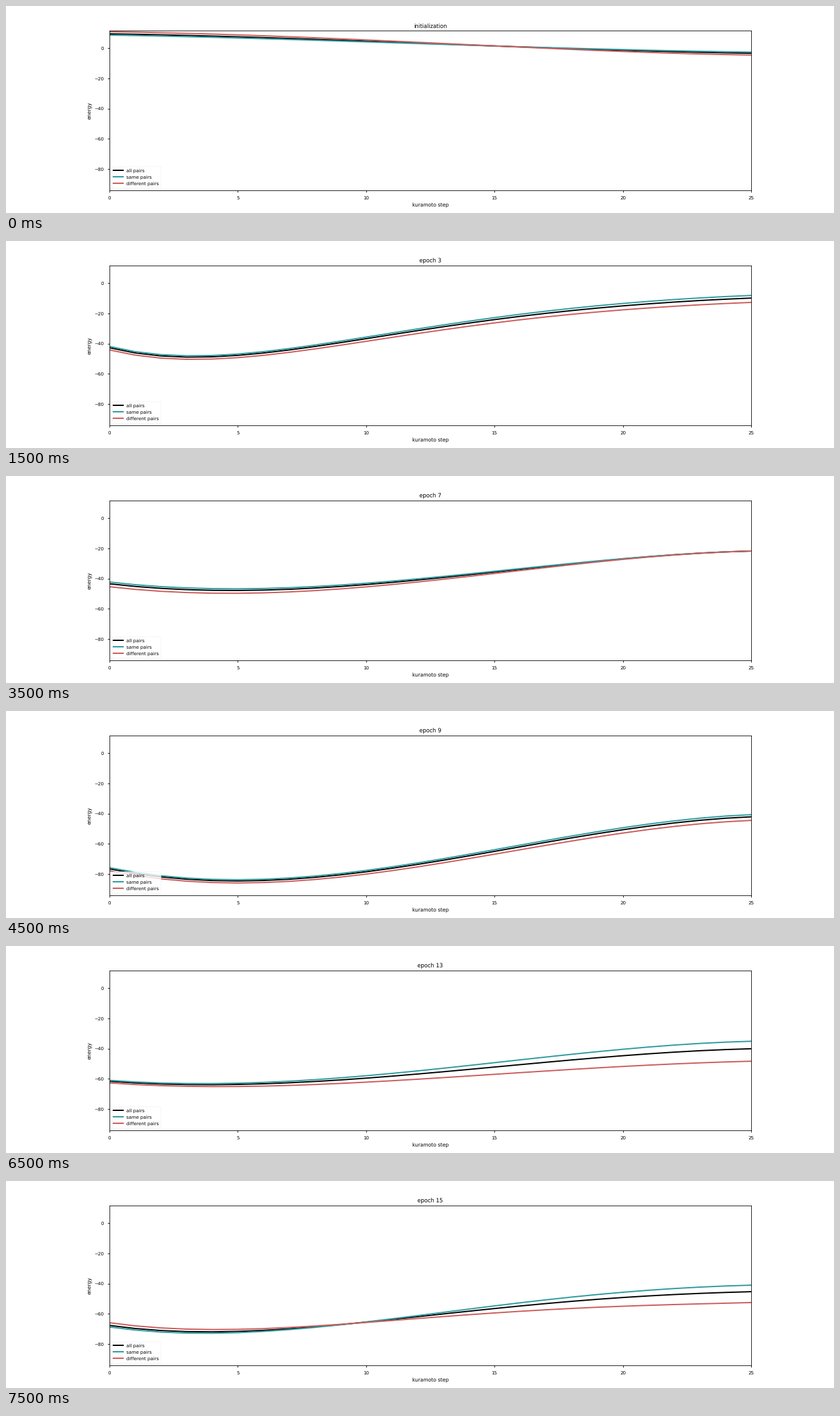
Animation of 1280 by 320 pixels, one loop 8000 ms. Source, as a matplotlib script:

```python
import numpy as np
import matplotlib.pyplot as plt
from matplotlib.animation import FuncAnimation

plt.rcParams.update({
    "font.family": "DejaVu Sans",
    "font.size": 10,
    "text.hinting": "none",
    "axes.labelsize": 11,
    "axes.titlesize": 12,
    "axes.titlepad": 7,
    "axes.linewidth": 1.2,
    "lines.linewidth": 2.8,
    "legend.edgecolor": "0.94",
})

EPOCHS = 16
STEPS = np.arange(26)
DIFF_SHARE = 0.375  # share of different pairs among all pairs

# Key points over the epochs, {epoch: value}; the rest is blended
START = {0: 9.5, 2: -15, 3: -42.7, 4: -46, 5: -58, 6: -43.4,
         7: -43.4, 8: -80, 10: -73, 11: -55.6, 15: -67.6}
END_RATIO = {0: -0.35, 3: 0.23, 5: 0.45, 13: 0.65, 15: 0.67}
DIP_RATIO = {0: 0, 3: 0.235, 5: 0.265, 7: 0.205, 11: 0.195, 13: 0.1, 15: 0.112}
DIP_DECAY = {3: 4, 5: 2, 13: 2, 15: 3}
GAP_START = {0: 2.2, 3: -2.3, 5: -1.3, 7: -3.1, 11: -1, 13: -1.7, 15: 2.8}
GAP_END = {0: -1.9, 3: -4.6, 5: 0, 7: 0, 11: -7.6, 13: -13.2, 15: -11.5}


def at(track, epoch):
    return np.interp(epoch, list(track), list(track.values()))


def smoothstep(u):
    return u * u * (3 - 2 * u)


def mean_energy(epoch, u):
    """Soft rise from start to end, minus an early dip that fades out."""
    start = at(START, epoch)
    end = start * at(END_RATIO, epoch)
    dip = abs(start) * at(DIP_RATIO, epoch)
    rise = (u + smoothstep(u)) / 2
    hump = u * (1 - u) ** at(DIP_DECAY, epoch)
    return start + (end - start) * rise - dip * hump / hump.max()


def pair_gap(epoch, u):
    """Energy of different pairs minus energy of same pairs."""
    first, last = at(GAP_START, epoch), at(GAP_END, epoch)
    return first + (last - first) * smoothstep(u ** 1.3)


def energies(epoch):
    u = STEPS / STEPS[-1]
    mean, gap = mean_energy(epoch, u), pair_gap(epoch, u)
    return mean, mean - DIFF_SHARE * gap, mean + (1 - DIFF_SHARE) * gap


fig, ax = plt.subplots(figsize=(25, 6.25), dpi=51.2)
fig.subplots_adjust(left=0.125, right=0.9, bottom=0.11, top=0.88)
ax.set(xlim=(0, 25), ylim=(-93.95, 11.5),
       xlabel="kuramoto step", ylabel="energy")
ax.tick_params(length=4.5, width=1.2, pad=7.5)

STYLES = [("all pairs", "black"),
          ("same pairs", "#2e9b9e"),
          ("different pairs", "#cd5c5c")]
lines = [ax.plot([], [], color=color, label=label)[0]
         for label, color in STYLES]
ax.legend(loc="lower left")
title = ax.set_title("initialization")


def update(epoch):
    for line, energy in zip(lines, energies(epoch)):
        line.set_data(STEPS, energy)
    title.set_text(f"epoch {epoch}" if epoch else "initialization")
    return [*lines, title]


anim = FuncAnimation(fig, update, frames=EPOCHS, interval=500,
                     repeat=True, repeat_delay=0, blit=False)
plt.show()
```
